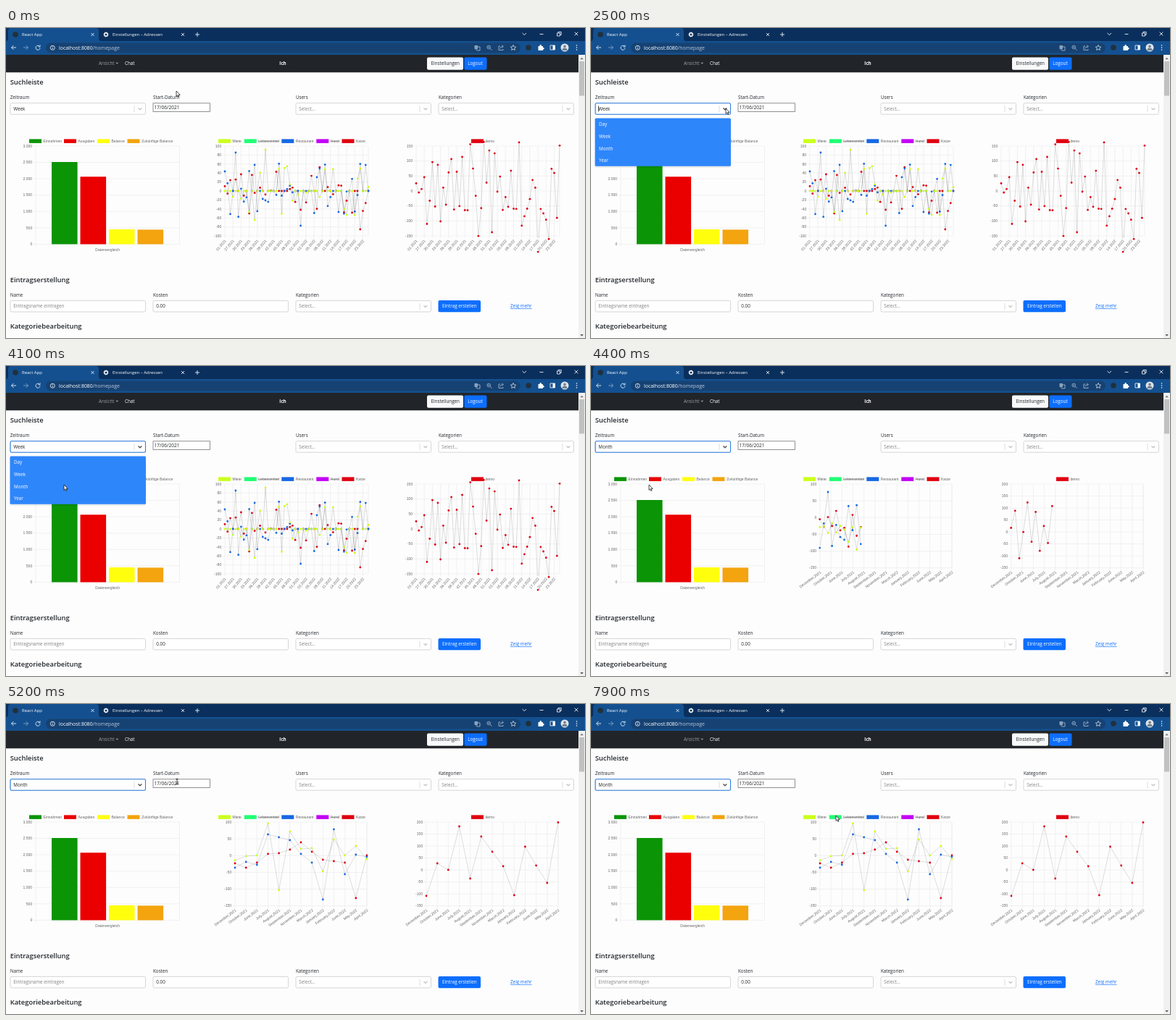
An HTML page that plays this animation: 799 px wide and 428 px high, repeating every 8 s.

```html
<!DOCTYPE html>
<html lang="de">
<head>
<meta charset="utf-8">
<title>React App</title>
<style>
  html, body { margin: 0; width: 100%; height: 100%; overflow: hidden; background: #fdfdfe; }
  svg { display: block; width: 799px; height: 428px; }
  text { font: 6.3px "Open Sans", "Noto Sans", sans-serif; fill: #212529; }
  .head { font-size: 9.4px; font-weight: 600; }
  .tab { font-size: 5.95px; fill: #fff; }
  .url { font-size: 6.95px; fill: #fff; }
  .date { font-size: 6.6px; }
  .light { fill: #fff; }
  .bold { font-weight: 700; fill: #fff; }
  .dim { fill: #9a9da0; }
  .hint { fill: #808080; }
  .link { fill: #0d6efd; text-decoration: underline; }
  .axis { font: 5.05px "Liberation Sans", Arial, sans-serif; fill: #666; }
  .struck { text-decoration: line-through; }
  .icon { fill: none; stroke: #e8eef6; stroke-width: .9; }
  .grid { fill: none; stroke: #e4e4e4; stroke-width: .5; }
  .trend { fill: none; stroke: #000; stroke-opacity: .13; stroke-width: 1; }
</style>
</head>
<body>
<svg viewBox="0 0 799 428"></svg>
<script>
const svg = document.querySelector('svg');
const range = n => [...Array(n).keys()];
const lerp = (a, b, k) => a + (b - a) * k;
const rect = (x, y, w, h, fill, extra = '') =>
  `<rect x="${x}" y="${y}" width="${w}" height="${h}" fill="${fill}" ${extra}/>`;
const text = (x, y, s, cls = '', extra = '') =>
  `<text x="${x}" y="${y}" class="${cls}" ${extra}>${s}</text>`;
const icon = (d, extra = '') => `<path class="icon" d="${d}" ${extra}/>`;
const dot = (x, y, r, fill) => `<circle cx="${x}" cy="${y}" r="${r}" fill="${fill}"/>`;
const cross = (x, y, r) => icon(`M${x - r} ${y - r}l${2 * r} ${2 * r}m0 ${-2 * r}l${-2 * r} ${2 * r}`);

/* Browser window */
function browser() {
  return rect(0, 0, 799, 20, '#0a2f5c') +
    '<path d="M0 18Q3 18 3 14V4Q3 0 7 0H124Q128 0 128 4V14Q128 18 131 18H799V37H0Z" fill="#14508f"/>' +
    dot(13, 9, 3.8, '#20303c') + text(22, 11.2, 'React App', 'tab') + cross(119.5, 9, 2) +
    '<circle cx="138" cy="9" r="2.2" fill="none" stroke="#fff" stroke-width="1.4"/>' +
    '<circle cx="138" cy="9" r="3.1" fill="none" stroke="#fff" stroke-width=".8" stroke-dasharray="1.2 1.2"/>' +
    text(147, 11.2, 'Einstellungen – Adressen', 'tab') + cross(244, 9, 2) +
    icon('M261 9h6m-3-3v6') +
    icon('M712.5 7l2.8 2.6L718 7M736.5 8.5h5M760.5 7h4v4h-4zM762 7V5.4h4.2v4H764.5') + cross(787, 8, 2.4) +
    rect(55, 20.5, 655, 14, '#164273', 'rx="7"') +
    icon('M14 27H7.5m3-3l-3 3 3 3') +
    icon('M24 27h6.5m-3-3l3 3-3 3', 'opacity=".5"') +
    icon('M46.2 25.2A3 3 0 1 0 47 27.6M47 23.5v2.4h-2.4') +
    icon('M67.3 27.3a3 3 0 1 0-6 0 3 3 0 1 0 6 0M64.3 26.8v2.2M64.3 25.2v.8') +
    text(73, 29.8, 'localhost:8080<tspan fill="#b9c7d9">/homepage</tspan>', 'url') +
    '<g opacity=".65">' + rect(646.5, 24, 4.5, 5, '#c9d4e2') + icon('M651 26h3v5h-4.5l-1-2') +
    icon('M668.5 26.5a2.3 2.3 0 1 0-4.6 0 2.3 2.3 0 1 0 4.6 0M668 28.2l2.6 2.6M665 26.5h2.4') +
    icon('M682 25h-2v5.5h6V29M681.8 28.5q.5-3 4-3m-1.5-2l2 2-2 2') + '</g>' +
    icon('M700 23.5l1.1 2.4 2.6.3-1.9 1.7.5 2.6-2.3-1.3-2.3 1.3.5-2.6-1.9-1.7 2.6-.3z', 'opacity=".8"') +
    dot(721, 27, 3.8, '#20303c') +
    '<path d="M734.5 25h2q-.3-2 1.2-2t1.2 2h2v2q1.8-.2 1.8 1.2t-1.8 1.2V31h-6.4z" fill="#fff"/>' +
    icon('M751 24h6.5v6H751z') + rect(754.5, 24, 3, 6, '#fff') +
    dot(771, 27, 5.5, '#dfe4ea') + dot(771, 25.4, 1.8, '#75818c') +
    '<path d="M767.5 31q0-3.4 3.5-3.4t3.5 3.4z" fill="#75818c"/>' +
    [24, 27, 30].map(y => dot(787.5, y, .8, '#fff')).join('');
}

/* Page controls */
const field = (x, y, content, cls = 'hint') =>
  rect(x + .5, y, 186.5, 15.5, '#fff', 'rx="1.8" stroke="#ccc" stroke-width=".8"') +
  text(x + 4.8, y + 10, content, cls);
const select = (x, y, content) => field(x, y, content) +
  `<path d="M${x + 171.5} ${y + 3.5}v9" stroke="#ccc" stroke-width=".7"/>` +
  `<path d="M${x + 177} ${y + 6.8}l2.4 2.3 2.4-2.3" fill="none" stroke="#bbb" stroke-width="1.1"/>`;

function page() {
  return rect(0, 37, 790, 24.3, '#212529') +
    text(128, 51.3, 'Ansicht', 'dim') + '<path d="M151.3 47.8h4l-2 2z" fill="#9a9da0"/>' +
    text(164, 51.3, 'Chat', 'light') + text(377.3, 51.3, 'Ich', 'bold') +
    rect(581, 40.5, 50, 17.2, '#f8f9fa', 'rx="2"') + text(586.5, 51.3, 'Einstellungen') +
    rect(632.3, 40.5, 31.2, 17.2, '#0d6efd', 'rx="2"') + text(637.3, 51.3, 'Logout', 'light') +
    text(5.7, 78, 'Suchleiste', 'head') +
    text(5.7, 97.6, 'Zeitraum') + text(203, 97.6, 'Start-Datum') +
    text(400, 97.6, 'Users') + text(597, 97.6, 'Kategorien') +
    select(5.5, 103.7, '') + select(399.5, 103.7, 'Select...') + select(596.5, 103.7, 'Select...') +
    rect(203, 103.8, 78.5, 11.7, '#fff', 'stroke="#767676" stroke-width=".8"') +
    text(204.5, 112.1, '17/06/2021', 'date') +
    text(5.7, 350.8, 'Eintragserstellung', 'head') +
    text(5.7, 370.5, 'Name') + text(203, 370.5, 'Kosten') + text(400, 370.5, 'Kategorien') +
    field(5.5, 376.4, 'Eintragsname eintragen') + field(202.5, 376.4, '0.00', '') +
    select(399.5, 376.4, 'Select...') +
    rect(596.5, 376, 58.5, 16.2, '#0d6efd', 'rx="2"') + text(602, 386.4, 'Eintrag erstellen', 'light') +
    text(696, 386.4, 'Zeig mehr', 'link') +
    text(5.7, 415.1, 'Kategoriebearbeitung', 'head') +
    rect(790, 37, 9, 391, '#f1f1f1') + rect(791, 46, 7, 47.5, '#c1c1c1') +
    '<path d="M792.3 43.3h4.6l-2.3-2.5z" fill="#777"/><path d="M792.3 423h4.6l-2.3 2.5z" fill="#555"/>';
}

/* Charts */
const YELLOW = '#cbff1c', BLUE = '#1668e3', RED = '#e0000f';
const WEEK = 198 / 53, MONTH = 182 / 12;
const legend = (x, fill, label, cls = '') =>
  rect(x, 153.4, 17, 5.5, fill) + text(x + 19.5, 157.8, label, 'axis ' + cls);

// ticks run from top to bottom, labels hang below at the given spacing
function grid({ x0, x1, y1, ticks, labels, gap, angle }) {
  const y0 = 163, dy = (y1 - y0) / (ticks.length - 1);
  let d = `M${x1} ${y0}V${y1}`, out = '';
  ticks.forEach((s, i) => {
    d += `M${x0 - 3.5} ${y0 + i * dy}H${x1}`;
    out += text(x0 - 4.8, y0 + i * dy + 1.7, s, 'axis', 'text-anchor="end"');
  });
  labels.forEach((s, i) => {
    const x = x0 + i * gap;
    d += `M${x} ${y0}V${y1 + 3.5}`;
    out += `<text class="axis" text-anchor="end" transform="translate(${x + 2} ${y1 + 7}) rotate(${-angle})">${s}</text>`;
  });
  return `<path class="grid" d="${d}"/>` + out;
}

const scale = (max, step, n) => range(n).map(i => max - i * step);
const year = (from, n, y) => range(n).map(i => String(from + 3 * i).padStart(2, '0') + '.' + y);
const weeks = ['01.2021', ...year(27, 9, 2021), ...year(2, 8, 2022)];
const months = [
  ...['December', 'October', 'June', 'July', 'August', 'September', 'November'].map(m => m + ',2021'),
  ...['March', 'January', 'February', 'June', 'May', 'April'].map(m => m + ',2022')];

const weekGrid = (x0, ticks) =>
  grid({ x0, x1: x0 + 198, y1: 287, ticks, labels: weeks, gap: 3 * WEEK, angle: 50 });
const monthGrid = (x0, ticks) =>
  grid({ x0, x1: x0 + 182, y1: 278.7, ticks, labels: months, gap: MONTH, angle: 36 });

function random(seed) {
  return () => {
    let z = seed = (seed + 0x6D2B79F5) | 0;
    z = Math.imul(z ^ z >>> 15, z | 1);
    z ^= z + Math.imul(z ^ z >>> 7, z | 61);
    return ((z ^ z >>> 14) >>> 0) / 2 ** 32;
  };
}

// 54 heights scattered around the zero line; a share of weeks is empty, peaks are fixed
function scatter(seed, spread, empty, peaks) {
  const rnd = random(seed);
  return range(54).map(i => {
    const bell = (rnd() + rnd() + rnd() - 1.5) * spread;
    return 225 - (peaks[i] ?? (rnd() < empty ? 0 : bell));
  });
}

// peaks are offsets from the zero line in pixels, month holds the settled heights
const datasets = [
  { color: RED, weekX: 302, monthX: 316,
    week: scatter(5, 36, .4, { 6: 23, 9: -31, 28: -26, 47: -30, 50: -53 }),
    month: [220, 226, 219, 207, 206, 201, 191, 204, 215, 217, 219, 268, 209] },
  { color: BLUE, weekX: 302, monthX: 316,
    week: scatter(8, 46, .4, { 0: 27, 4: 53, 11: 36, 28: -48, 35: 31 }),
    month: [226, 218, 222, 180, 184, 188, 207, 219, 270, 173, 235, 208, 211] },
  { color: YELLOW, weekX: 302, monthX: 316,
    week: scatter(3, 36, .6, { 0: 0, 9: -29, 11: -40, 15: 57, 37: 30, 40: 30 }),
    month: [216, 210, 209, 165, 257, 176, 200, 199, 231, 187, 209, 196, 214] },
  { color: RED, weekX: 566, monthX: 580,
    week: scatter(11, 70, 0, { 9: -42, 13: 44, 17: 47, 28: -57, 47: -31 }),
    month: [265, 220, 229, 169, 241, 183, 204, 224, 264, 197, 223, 247, 163.5] }];

function series(points, color, x0) {
  const path = points.map(p => p.map(v => v.toFixed(1))).join(' ');
  return `<polyline class="trend" points="${path}" clip-path="url(#area${x0})"/>` +
    points.filter(p => p[0] > x0 - 1).map(p => dot(p[0].toFixed(1), p[1].toFixed(1), 1.4, color)).join('');
}
const weekLines = () => datasets.map(s =>
  series(s.week.map((y, i) => [s.weekX + i * WEEK, y]), s.color, s.weekX)).join('');
const monthLines = p => datasets.map(s => series(s.month.map((y, i) =>
  [lerp(s.weekX + i * WEEK, s.monthX + i * MONTH, p), lerp(s.week[i], y, p)]), s.color, s.monthX)).join('');

function bars() {
  const names = ['Einnahmen', 'Ausgaben', 'Balance', 'Zukünftige Balance'];
  const fills = ['#0b9406', '#eb0000', '#ffff0d', '#f3a40e'];
  const tops = [185, 205.3, 278, 278.4], keys = [32, 80, 126, 167.5];
  return grid({ x0: 41, x1: 239.5, y1: 298.5, gap: 0, angle: 0, labels: [],
    ticks: ['3.000', '2.500', '2.000', '1.500', '1.000', '500', '0'] }) +
    '<path class="grid" d="M41 163V302"/>' +
    names.map((name, i) => rect(63 + i * 39.5, tops[i], 35.6, 298.5 - tops[i], fills[i]) +
      legend(keys[i], fills[i], name)).join('') +
    text(140.2, 307.8, 'Datenvergleich', 'axis', 'text-anchor="middle"');
}

const legends = legend(293, YELLOW, 'Miete') + legend(328.8, '#20ff74', 'Lebensmittel', 'struck') +
  legend(380.3, BLUE, 'Restaurant') + legend(428.3, '#c400f5', 'Hund', 'struck') +
  legend(463.5, RED, 'Katze') + legend(642, RED, 'demo');

const focus = rect(6, 103.7, 186.5, 15.5, 'none', 'rx="1.8" stroke="#2f80e4" stroke-width="1.1"') +
  '<path d="M182.5 110.5l2.4 2.3 2.4-2.3" fill="none" stroke="#555" stroke-width="1.2"/>';
const menu = rect(5.5, 125, 187.5, 68, '#000', 'opacity=".08" rx="2"') +
  rect(5.5, 124.4, 187.5, 66.3, '#2e86fb', 'rx="1.5"') +
  ['Day', 'Week', 'Month', 'Year'].map((s, i) => text(11, 135.1 + i * 16.7, s, 'light')).join('');
const clip = (x, w) => `<clipPath id="area${x}">${rect(x, 160, w, 130, '#000')}</clipPath>`;

svg.innerHTML = '<defs>' + clip(302, 199) + clip(566, 199) + clip(316, 183) + clip(580, 183) + '</defs>' +
  rect(0, 0, 799, 428, '#fdfdfe') + browser() + page() + bars() + legends +
  `<g id="weeks">${weekGrid(302, scale(100, 20, 11)) + weekGrid(566, scale(150, 50, 7)) + weekLines()}</g>` +
  `<g id="months">${monthGrid(316, scale(100, 50, 6)) + monthGrid(580, scale(200, 50, 8))}<g id="lines"></g></g>` +
  text(10.3, 113.7, '', '', 'id="period"') + `<g id="focus">${focus}</g>` +
  rect(10, 107.5, .7, 8, '#000', 'id="caret"') + `<g id="menu">${menu}</g>` +
  '<g id="cursor"><path id="arrow" d="M0 0V7.4L1.7 5.8 2.8 8.4 4 7.9 2.9 5.4H5.2Z" fill="#fff" stroke="#000" stroke-width=".7"/>' +
  '<path id="beam" d="M-1.5-3.5H1.5M0-3.5V3.5M-1.5 3.5H1.5" stroke="#000" stroke-width=".8"/></g>';

/* Timeline */
const LOOP = 8000, OPEN = 2000, PICK = 4355;
const START = [235, 87], ARROW = [186, 111], OPTION = [80, 164], DATE = [236, 107], KEY = [338, 154];
const moves = [[300, 1000, START, ARROW], [2900, 3700, ARROW, OPTION],
  [4600, 5200, OPTION, DATE], [5900, 7400, DATE, KEY]];
const $ = id => document.getElementById(id);
const show = (id, on) => $(id).setAttribute('visibility', on ? 'visible' : 'hidden');
const clamp = k => Math.min(Math.max(k, 0), 1);
const smooth = k => k * k * (3 - 2 * k);
const outQuart = k => 1 - (1 - clamp(k)) ** 4;

function pointer(t) {
  const [from, to, a, b] = moves.findLast(m => t >= m[0]) ?? moves[0];
  const k = smooth(clamp((t - from) / (to - from)));
  return [lerp(a[0], b[0], k), lerp(a[1], b[1], k)];
}

function render(t) {
  const picked = t >= PICK, open = t >= OPEN && !picked;
  const [x, y] = pointer(t);
  const inDate = x > 203 && x < 281 && y > 104 && y < 115;
  show('weeks', !picked);
  show('months', picked);
  show('focus', t >= OPEN);
  show('menu', open);
  show('caret', open && Math.floor((t - OPEN) / 530) % 2 === 0);
  show('arrow', !inDate);
  show('beam', inDate);
  $('period').textContent = picked ? 'Month' : 'Week';
  $('cursor').setAttribute('transform', `translate(${x} ${y})`);
  $('lines').innerHTML = picked ? monthLines(outQuart((t - PICK) / 1000)) : '';
}

let last = -1;
const start = performance.now();
function tick() {
  const t = Math.floor((performance.now() - start) % LOOP / 100) * 100;
  if (t !== last) render(last = t);
  requestAnimationFrame(tick);
}
tick();
</script>
</body>
</html>
```
